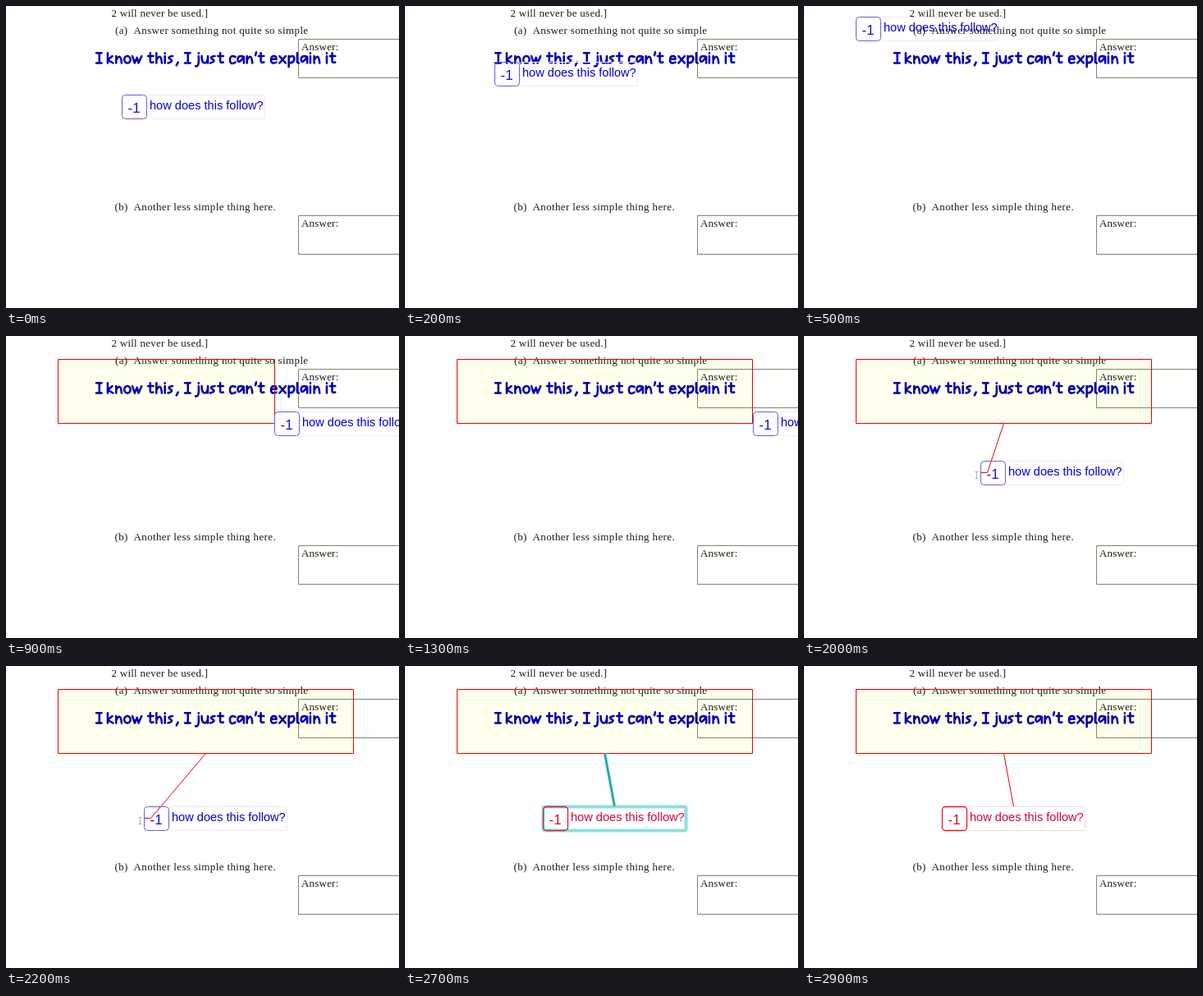
An HTML page with a canvas for the animation above (4100 ms loop, 479 px wide and 368 px high).

```html
<!DOCTYPE html>
<html lang="en">
<head>
<meta charset="utf-8">
<title>Box and comment annotation</title>
<style>
html, body { margin: 0; width: 100%; height: 100%; overflow: hidden; background: #fff; }
canvas { display: block; }
</style>
</head>
<body>
<canvas id="stage" width="479" height="368"></canvas>
<script>
const ctx = document.getElementById('stage').getContext('2d');
const LOOP = 4100, STEP = 100;
const SERIF = '13px "Liberation Serif", serif';
const SANS = '"Liberation Sans", sans-serif';
const RED = '#f00000', INK = '#0000b8';
const CORNER = { x: 63.5, y: 28.5 };
const BOX_END = { x: 423.5, y: 106.5 };

// Pointer path: time, x, y
const PATH = [
  [0, 141, 123], [100, 137, 119], [300, 82, 46], [400, 65, 23], [500, 63, 28],
  [600, 68, 31], [700, 130, 62], [900, 327, 106.5], [1100, 405, 109],
  [1300, 424, 106.5], [1600, 424, 106.5], [1800, 345, 134], [2000, 215, 166.5],
  [2200, 168, 185.5]
];

// Snapped so that one-pixel outlines stay crisp
const snap = (x, y) => ({ x: Math.floor(x) + 0.5, y: Math.round(y) });

function pointer(t) {
  const i = PATH.findIndex(p => p[0] > t);
  if (i < 0) { const [, x, y] = PATH[PATH.length - 1]; return snap(x, y); }
  const a = PATH[i - 1], b = PATH[i];
  const k = (t - a[0]) / (b[0] - a[0]);
  return snap(a[1] + (b[1] - a[1]) * k, a[2] + (b[2] - a[2]) * k);
}

// Single-stroke handwriting, baseline at 0
const stem = 'M1-13V0', short = 'M1-9V0', hump = 'M1-4Q7-14 8 0', dot = 'M1-13v.5';
const bowl = 'M7-5Q7-9 4-9 0-9 0-4 0 2 7-1';
const GLYPHS = {
  I: 'M0-13H7M4-13V0M0 0H7',
  k: stem + 'M7-9L1-4 8 0',
  n: short + hump,
  h: stem + hump,
  i: short + dot,
  o: 'M4-9a4 4.5 0 1 0 1 0',
  w: 'M0-9L3 0 6-7 8 0 12-9',
  t: 'M3-13V-2Q4 0 7-1M0-9H7',
  s: 'M6-9Q-2-8 3-5T0 0',
  ',': 'M3-1L1 3',
  j: 'M4-9Q5 6 0 4M4-13v.5',
  u: 'M0-9Q0 0 4 0T8-9V0',
  c: 'M7-8Q0-11 0-4T7-1',
  a: 'M8-8Q0-11 0-4 1 2 8-8V0',
  "'": 'M2-14L1-10',
  e: 'M0-5H7' + bowl,
  x: 'M0-9L8 0M8-9L0 0',
  p: 'M1-9V5M1-7Q9-12 8-4 6 1 1-1',
  l: 'M1-13V-2Q1 0 3 0'
};
const WIDTHS = { w: 12, t: 7, s: 7, c: 7, j: 5, l: 3, i: 2, ',': 2, "'": 2 };

function handwrite(word, x, y) {
  ctx.save();
  ctx.strokeStyle = INK;
  ctx.lineWidth = 2.7;
  ctx.lineCap = ctx.lineJoin = 'round';
  ctx.translate(x, y);
  ctx.scale(0.94, 0.94);
  for (const ch of word) {
    ctx.stroke(new Path2D(GLYPHS[ch]));
    ctx.translate((WIDTHS[ch] || 8) + 3, 0);
  }
  ctx.restore();
}

function text(str, x, y, font, color, spacing = 0) {
  ctx.font = font;
  ctx.fillStyle = color;
  ctx.letterSpacing = spacing + 'px';
  ctx.fillText(str, x, y);
}

function line(color, width, ...pts) {
  ctx.strokeStyle = color;
  ctx.lineWidth = width;
  ctx.beginPath();
  pts.forEach(p => ctx.lineTo(p[0], p[1]));
  ctx.stroke();
}

function frame(x, y, w, h, color, radius = 0, width = 1) {
  ctx.strokeStyle = color;
  ctx.lineWidth = width;
  ctx.beginPath();
  ctx.roundRect(x, y, w, h, radius);
  ctx.stroke();
}

function drawPage() {
  ctx.fillStyle = '#fff';
  ctx.fillRect(0, 0, 479, 368);
  const print = (s, x, y, gap = 0.37) => text(s, x, y, SERIF, '#1c1c14', gap);
  print('2 will never be used.]', 128.5, 13, 0.25);
  print('(a)', 133, 34);
  print('Answer something not quite so simple', 155.5, 34);
  print('(b)', 132.5, 249);
  print('Another less simple thing here.', 155.5, 249);
  for (const y of [40.5, 255.5]) {
    frame(356.5, y, 140, 47, '#84846a');
    print('Answer:', 360, y + 13.5, 0.2);
  }
  const words = { 110: 'I', 123: 'know', 173: 'this,', 218: 'I', 231: 'just',
    273: "can't", 323: 'explain', 390: 'it' };
  for (const x in words) handwrite(words[x], +x, 69.5);
}

function drawBox(end) {
  const w = end.x - CORNER.x, h = end.y - CORNER.y;
  ctx.globalCompositeOperation = 'multiply';
  ctx.fillStyle = '#ffffee';
  ctx.fillRect(CORNER.x, CORNER.y, w, h);
  ctx.globalCompositeOperation = 'source-over';
  frame(CORNER.x, CORNER.y, w, h, RED);
}

function drawTag(p, placed) {
  const top = p.y - 14.5;
  if (placed) ctx.setLineDash([1, 1]);
  frame(p.x + 30, top, 144, 29, placed ? '#e2b4a8' : '#ececf4', 3);
  ctx.setLineDash([]);
  frame(p.x, top, 30, 29, placed ? '#f01020' : '#6060e8', 4, placed ? 1.3 : 1);
  text('-1', p.x + 7, p.y + 6.5, '17px ' + SANS, placed ? '#e00820' : '#1414d0');
  text('how does this follow?', p.x + 33.5, p.y + 3, '14.6px ' + SANS,
    placed ? '#d00838' : '#0000d0');
}

function drawCursor(x, y) {
  line('#a8b4b4', 1, [x, y - 4], [x, y + 4]);
  for (const s of [-4, 4]) line('#a8b4b4', 1, [x - 2, y + s], [x + 2, y + s]);
}

function drawGlow(p, from, to, alpha) {
  ctx.globalAlpha = alpha;
  line('#70dede', 4, from, to);
  frame(p.x, p.y - 14.5, 174, 29, '#80e6e6', 2, 4);
  line('#268494', 1.5, from, to);
  ctx.globalAlpha = 1;
}

function render(t) {
  const p = pointer(t);
  const placed = t >= 2700;
  drawPage();
  if (t >= 600) drawBox(t < 1300 ? { x: p.x, y: p.y - 0.5 } : BOX_END);
  const from = [(CORNER.x + BOX_END.x) / 2, BOX_END.y];
  if (placed) {
    const to = [p.x + 87, p.y - 14.5];
    line(RED, 1, from, to);
    if (t < 2900) drawGlow(p, from, to, t < 2800 ? 1 : 0.5);
  } else if (t >= 1700) {
    const y = p.y - 0.5;
    line(RED, 1, from, [p.x + 8, y], [p.x, y]);
    drawCursor(p.x - 5, y + 3);
  }
  drawTag(p, placed);
}

const start = performance.now();
function tick() {
  const t = (performance.now() - start) % LOOP;
  render(Math.floor(t / STEP) * STEP);
  requestAnimationFrame(tick);
}
tick();
</script>
</body>
</html>
```
